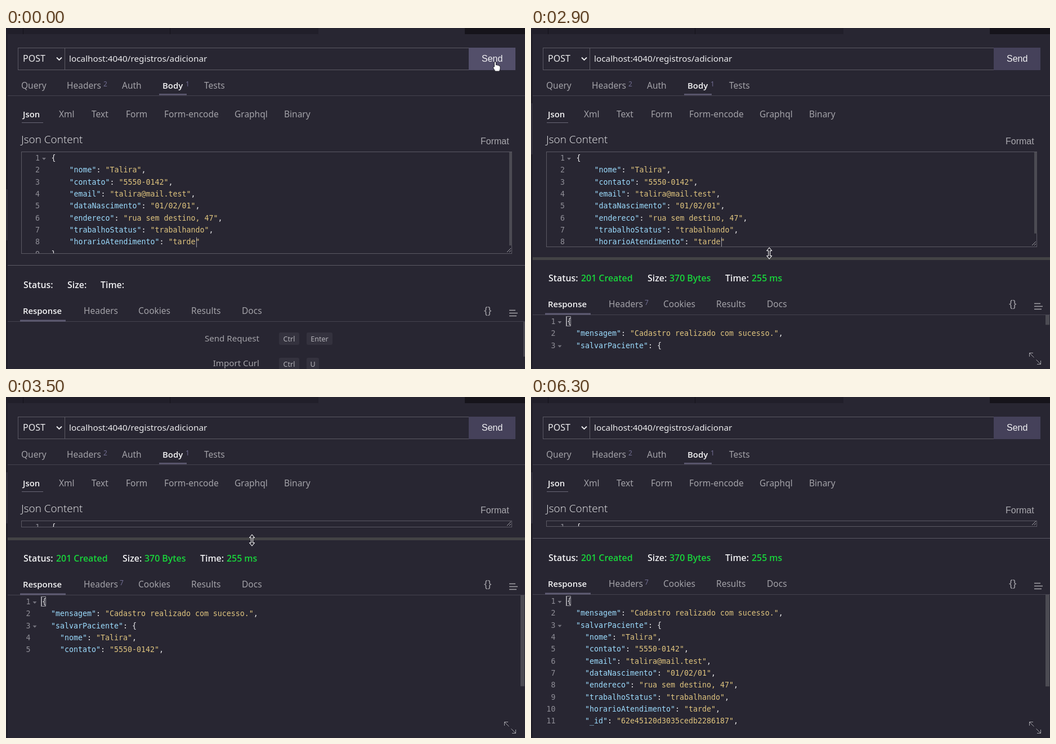
An HTML page that plays this animation: 922x607 px, repeating every 7 s.

```html
<!DOCTYPE html>
<html lang="pt">
<head>
<meta charset="utf-8">
<title>API client</title>
<style>
  html, body { margin: 0; width: 100%; height: 100%; overflow: hidden; background: #282632; }
  svg { display: block; width: 100%; height: 100%; }
  text { font: 15.5px "Noto Sans", "Open Sans", sans-serif; fill: #a3a2a8; white-space: pre; }
  .on { font: 600 14.9px "Open Sans", "Noto Sans", sans-serif; fill: #f4f4f5; }
  .field { font-size: 15.3px; fill: #ececee; }
  .verb { font-size: 16px; fill: #ececee; }
  .title { font: 300 19px "Open Sans", "Noto Sans", sans-serif; fill: #ececee; }
  .stat { font: 600 15.9px "Open Sans", "Noto Sans", sans-serif; fill: #f0f0f2; }
  .ok { fill: #18d63b; }
  .sup { font-size: 12px; fill: #716e92; }
  .braces { font-size: 18px; }
  .btn { font: 16px "Liberation Sans", Arial, sans-serif; fill: #a9a8ae; }
  .send { fill: #f2f2f4; }
  .hint { font-size: 15.1px; text-anchor: end; }
  .cap { font-size: 12.5px; text-anchor: middle; fill: #b4b3b9; }
  .code { font: 13.29px "DejaVu Sans Mono", "Noto Sans Mono", monospace; fill: #e8e8ea; }
  .num { fill: #8f8e97; text-anchor: end; }
  .key { fill: #9cdcfe; }
  .str { fill: #dfc47e; }
  .val { fill: #8ba6ea; }
  .line { fill: none; stroke: #a3a2a8; }
  .frame { fill: none; stroke: #5b5964; }
  .mark { fill: none; stroke: #a09fa6; }
  .ink { fill: #24222c; stroke: #fff; stroke-width: 1.1; stroke-linejoin: round; }
</style>
</head>
<body>
<svg viewBox="0 0 922 607">
  <defs>
    <clipPath id="editClip"><rect id="editBox" x="28" y="221" width="866" height="179"/></clipPath>
    <clipPath id="respClip"><rect id="respBox" x="3" width="910"/></clipPath>
  </defs>

  <rect width="922" height="607" fill="#282632"/>
  <rect width="555" height="11" fill="#211f2a"/>
  <path d="M30.5 0V11M291.5 0V11" stroke="#15131b"/>
  <rect x="815" width="107" height="11" fill="#16141b"/>
  <rect y="11" width="3" height="596" fill="#211f2a"/>
  <rect id="side" width="3" height="91" fill="#302e3b"/>

  <g id="top">
    <rect class="frame" x="21.5" y="35.5" width="883" height="39"/>
    <path class="frame" d="M104.5 35V75"/>
    <path d="M90 52.5l4.500 4.500 4.500-4.500" fill="none" stroke="#f0f0f2" stroke-width="1.800"/>
    <rect id="send" x="822" y="35" width="83" height="40"/>
    <path d="M3 120.500H922" stroke="#45434f"/>
    <rect x="272" y="117" width="49" height="2.500" fill="#5e5b72"/>
    <path d="M28 168.500H66" stroke="#6a6877"/>
  </g>

  <rect id="editFrame" class="frame" x="27.5" y="220.5" width="871"/>
  <g id="editor" clip-path="url(#editClip)"></g>
  <rect id="editThumb" x="894" y="221" width="5" fill="#4c4b53"/>
  <path id="grip" class="line" d="M890 -2L897 -9M894 -2L897 -5"/>

  <g id="panel">
    <path id="rule" d="M3 .500H922" stroke="#5b5964"/>
    <rect id="band" x="3" y="-2" width="919" height="5" fill="#434345"/>
    <path d="M3 100.500H922" stroke="#45434f"/>
    <rect x="25" y="97.500" width="81" height="3" fill="#5e5b72"/>
    <path class="line" stroke-width="1.400" d="M894 80.500H905M894 85.500H909M894 90.500H907"/>
  </g>

  <g id="hints">
    <rect x="919" y="523" width="3" height="62" fill="#4a4952"/>
  </g>
  <g id="result">
    <g clip-path="url(#respClip)">
      <g id="resp"></g>
    </g>
    <rect id="respThumb" x="914" width="7" fill="#4c4b53"/>
    <path class="line" d="M885.500 585V578.500H892M885.500 578.500L893.500 586.500M897.500 590.500L905.500 598.500M899 598.500H905.500V592"/>
  </g>
  <g id="copy">
    <rect class="frame" x="839.500" y="363.500" width="57" height="30" rx="3"/>
  </g>

  <g id="pointer">
    <path id="arrow" class="ink" d="M0 0V15.500L3.600 12.200L6 18L8.600 16.900L6.200 11.300H11Z"/>
    <path id="size" class="ink" d="M0 -10L4.500 -4.500H1.500V4.500H4.500L0 10L-4.500 4.500H-1.500V-4.500H-4.500Z"/>
    <g id="beam" fill="none">
      <path d="M-4 -8.500H-1.500L0 -7.500L1.500 -8.500H4M0 -7.500V7.500M-4 8.500H-1.500L0 7.500L1.500 8.500H4" stroke="#24222c" stroke-width="3"/>
      <path d="M-4 -8.500H-1.500L0 -7.500L1.500 -8.500H4M0 -7.500V7.500M-4 8.500H-1.500L0 7.500L1.500 8.500H4" stroke="#fff" stroke-width="1.300"/>
    </g>
    <path id="hand" d="M-1.500 9V1Q0 -1.500 1.500 1V6Q3 4.500 4.300 6.500Q5.800 5.500 7 7.300Q8.800 6.800 9 9V13L7.500 17H0L-3.500 11Q-4 8.500 -1.500 9Z" fill="#fff" stroke="#24222c"/>
  </g>
</svg>

<script>
const $ = id => document.getElementById(id);
const PITCH = 21.33, FLOOR = 588, LOOP = 7000, STEP = 100;

function add(parent, tag, attrs, content) {
  const el = document.createElementNS("http://www.w3.org/2000/svg", tag);
  for (const k in attrs) el.setAttribute(k, attrs[k]);
  if (content !== undefined) el.textContent = content;
  return parent.appendChild(el);
}
const label = (parent, x, y, str, cls = "") => add(parent, "text", { x, y, class: cls }, str);
const row = (parent, y, items) => items.forEach(([x, str, cls]) => label(parent, x, y, str, cls));
const show = (el, on) => { el.style.display = on ? "" : "none"; };

// Static labels
row($("top"), 60, [[30, "POST", "verb"], [112, "localhost:4040/registros/adicionar", "field"], [845, "Send", "btn send"]]);
row($("top"), 108, [[27, "Query"], [108, "Headers"], [206, "Auth"], [278, "Body", "on"], [352, "Tests"]]);
row($("top"), 104, [[173, "2", "sup"], [319, "1", "sup"]]);
row($("top"), 159, [[30, "Json", "on"], [94, "Xml"], [152, "Text"], [213, "Form"],
  [281, "Form-encode"], [406, "Graphql"], [494, "Binary"]]);
label($("top"), 27, 205, "Json Content", "title");
label($("top"), 843, 207, "Format", "btn");
label($("copy"), 849, 383, "Copy", "btn");

const panel = $("panel");
const idle = add(panel, "g", {}), done = add(panel, "g", {});
row(idle, 41, [[31, "Status:", "stat"], [109, "Size:", "stat"], [168, "Time:", "stat"]]);
row(done, 41, [[31, "Status:", "stat"], [89, "201 Created", "stat ok"], [207, "Size:", "stat"],
  [246, "370 Bytes", "stat ok"], [345, "Time:", "stat"], [392, "255 ms", "stat ok"]]);
label(done, 202, 83, "7", "sup");
row(panel, 87, [[30, "Response", "on"], [138, "Headers"], [235, "Cookies"], [329, "Results"],
  [419, "Docs"], [849, "{}", "braces"]]);

function keycap(x, y, w, str) {
  add($("hints"), "rect", { x, y, width: w, height: 22, rx: 3, fill: "#34323e" });
  label($("hints"), x + w / 2, y + 15.5, str, "cap");
}
label($("hints"), 450, 558, "Send Request", "hint");
label($("hints"), 450, 602, "Import Curl", "hint");
keycap(485, 542, 36, "Ctrl");
keycap(534, 542, 46, "Enter");
keycap(485, 587, 36, "Ctrl");
keycap(534, 587, 22, "U");

// Code listings
const fields = [
  '"nome": "Talira",', '"contato": "5550-0142",', '"email": "talira@mail.test",',
  '"dataNascimento": "01/02/01",', '"endereco": "rua sem destino, 47",',
  '"trabalhoStatus": "trabalhando",', '"horarioAtendimento": "tarde"'
];
const indent = (n, list) => list.map(s => " ".repeat(n) + s);
const request = ["{", ...indent(4, fields), "}"];
const reply = ["{", '  "mensagem": "Cadastro realizado com sucesso.",', '  "salvarPaciente": {',
  ...indent(4, fields.slice(0, 6)),
  ...indent(4, [fields[6] + ",", '"_id": "62e45120d3035cedb2286187",',
    '"createdAt": "2022-07-29T21:29:04.613Z",', '"updatedAt": "2022-07-29T21:29:04.613Z",', '"__v": 0']),
  "  }", "}"];

function listing(parent, lines, numX, textX, base) {
  return lines.map((src, i) => {
    const g = add(parent, "g", { transform: `translate(0 ${base + i * PITCH})` });
    const body = src.trimStart();
    label(g, numX, 0, i + 1, "code num");
    if (src.endsWith("{")) add(g, "path", { d: `M${numX + 4} -5h7l-3.500 4z`, fill: "#74737d" });
    const text = label(g, textX + 8 * (src.length - body.length), 0, "", "code");
    for (const part of body.match(/"[^"]*"|\d+|[^"\d]+/g)) {
      const after = body[body.indexOf(part) + part.length];
      const cls = part[0] === '"' ? (after === ":" ? "key" : "str") : /\d/.test(part) ? "val" : "";
      add(text, "tspan", { class: cls }, part);
    }
    return g;
  });
}
const editLines = listing($("editor"), request, 60, 80.5, 236);
add(editLines[7], "path", { class: "mark", d: "M338.500 -13V5" });
const respLines = listing($("resp"), reply, 43.5, 64, 117);
const open = add(respLines[0], "path", { class: "mark", d: "M63.500 -13.500h7v17h-7zM62.500 -14V4" });
const close = add(respLines[15], "path", { class: "mark", d: "M62.500 -13.500h8v17h-8zM72.500 -14V4" });

// Motion tracks: [time, value...]
const splitPath = [[2800, 422], [2900, 410], [3100, 362], [3400, 266], [3500, 252], [3600, 252], [3700, 251]];
const scrollPath = [[4500, 0], [4600, 32], [4900, 107], [5400, 107], [5900, 0]];
const pointerPath = [
  [700, 869, 60], [900, 862, 68], [1200, 809, 81], [1500, 470, 356], [1800, 425, 403], [1900, 421, 419],
  [2000, 421, 419], [2100, 420, 411], [2200, 420, 411], [2300, 417, 446], [2400, 417, 425],
  [2600, 423, 421], [2800, 423, 421], [3100, 424, 361], [3500, 437, 255], [3700, 438, 254],
  [3800, 362, 399], [3900, 362, 399], [4000, 319, 486], [4100, 319, 486], [4200, 312, 502],
  [5300, 312, 502], [5400, 328, 513], [5700, 328, 513], [6100, 260, 309], [6200, 106, 70]
];
const shapes = [[0, "hand"], [1000, "arrow"], [1900, "size"], [2100, "arrow"], [2600, "size"],
  [3800, "beam"], [6100, "arrow"], [6300, ""]];

function at(path, t) {
  const i = path.findIndex(p => p[0] > t);
  if (i < 0) return path[path.length - 1].slice(1);
  if (i === 0) return path[0].slice(1);
  const a = path[i - 1], b = path[i], k = (t - a[0]) / (b[0] - a[0]);
  return a.slice(1).map((v, j) => v + (b[j + 1] - v) * k);
}
const within = (t, from, to) => t >= from && t < to;

function render(t) {
  const [split] = at(splitPath, t), [scroll] = at(scrollPath, t), [px, py] = at(pointerPath, t);
  const loaded = t >= 1100;

  $("send").setAttribute("fill", t < 1000 ? "#534f6a" : "#45415a");
  $("side").setAttribute("y", loaded ? 134 : 287);

  // Request editor shrinks with the divider
  const bottom = Math.round(split - 21.5), h = bottom - 221;
  $("editFrame").setAttribute("height", bottom - 220);
  $("editBox").setAttribute("height", h);
  $("editThumb").setAttribute("height", h * h / 195);
  $("grip").setAttribute("transform", `translate(0 ${bottom})`);

  panel.setAttribute("transform", `translate(0 ${Math.round(split)})`);
  show($("band"), within(t, 1900, 2100) || within(t, 2600, 3800));
  show(idle, !loaded);
  show(done, loaded);
  show($("hints"), !loaded);
  show($("result"), loaded);
  show($("copy"), within(t, 3800, 6100));

  // Response viewer
  const top = Math.round(split) + 101, view = FLOOR - top;
  const total = reply.length * PITCH;
  const drawn = t < 3700 ? Math.min(5, Math.floor(view / PITCH)) : reply.length;
  $("respBox").setAttribute("y", top);
  $("respBox").setAttribute("height", view);
  $("resp").setAttribute("transform", `translate(0 ${Math.round(split) - scroll})`);
  respLines.forEach((g, i) => show(g, i < drawn));
  const atEnd = within(t, 4900, 5700);
  show(open, t >= 1300 && !atEnd);
  show(close, atEnd);
  $("respThumb").setAttribute("y", top + scroll * view / total);
  $("respThumb").setAttribute("height", Math.max(16, view * view / total));

  const shape = shapes.filter(s => s[0] <= t).pop()[1];
  for (const id of ["hand", "arrow", "size", "beam"]) show($(id), id === shape);
  $("pointer").setAttribute("transform", `translate(${px} ${py})`);
}

const start = performance.now();
function tick() {
  const t = (performance.now() - start) % LOOP;
  render(Math.floor(t / STEP) * STEP);
  requestAnimationFrame(tick);
}
tick();
</script>
</body>
</html>
```
